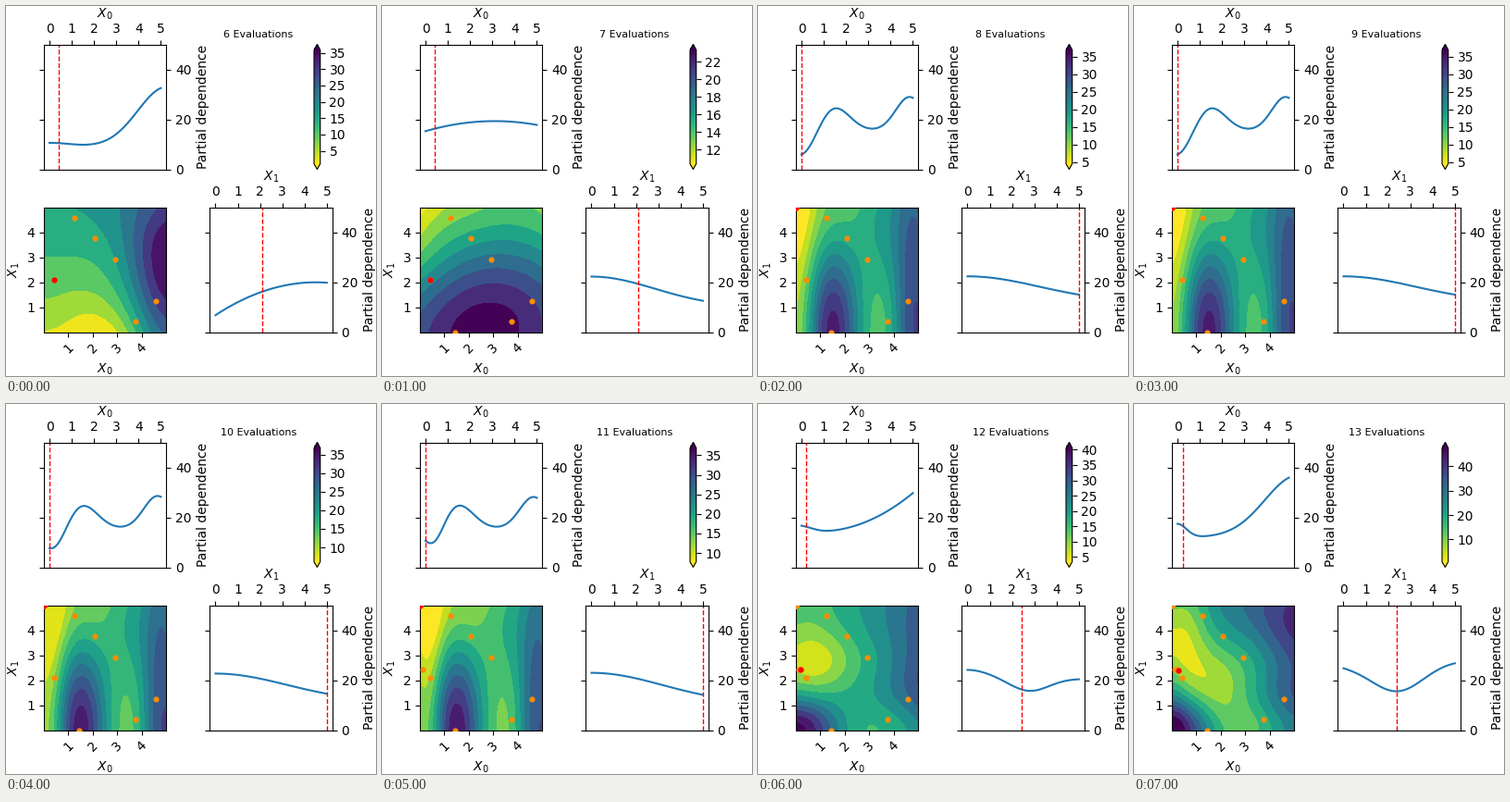
A matplotlib script for the animation above (8000 ms loop, 400 by 400 pixels).

```python
import numpy as np
import matplotlib.pyplot as plt
from matplotlib.animation import FuncAnimation
from matplotlib.cm import ScalarMappable
from matplotlib.colors import Normalize
from matplotlib.ticker import MaxNLocator

SIZE = 400
CMAP = "viridis_r"
AX_W, AX_H = 132.45, 134.95
LEFT, RIGHT = 41, 220.45
TOP, BOTTOM = 41.6, 217.75

GRID = np.linspace(0, 5, 60)
x, y = GRID[None, :], GRID[:, None]

# Six cells of a Latin square come first, then the suggested settings
cells = [(1, 5), (2, 4), (3, 3), (4, 0), (5, 1), (0, 2)]
POINTS = [((i + 0.5) * 5 / 6, (j + 0.5) * 5 / 6) for i, j in cells]
POINTS += [(1.42, 0)] + [(0, 5)] * 3 + [(0.1, 2.45), (0.2, 2.42), (0.25, 2.4)]


def best_point(count):
    if count < 8:
        return POINTS[5]
    return POINTS[7] if count < 12 else POINTS[count - 1]


def bump(t, center, width):
    return np.exp(-0.5 * ((t - center) / width) ** 2)


def hill(cx, wx, cy, wy):
    return bump(x, cx, wx) * bump(y, cy, wy)


# Each model gives its colour limits, both main effects and their interaction.

def valley():
    g = 9 + 1.6 * bump(x, 0, 1) + 24 * bump(x, 5.25, 1.28)
    h = 20 - 0.65 * (y - 4.5) ** 2
    twist = 5 * hill(0, 1, 0, 1) - 14 * hill(5, 1, 5.5, 1.2)
    return 1.07, 35.8, g, h, twist


def dome():
    g = 19.3 - 0.42 * (x - 3.1) ** 2
    h = 10 + 12.3 * bump(y, 0, 2.84)
    twist = 0.22 * (x - 2.5) * (y - 2.5) + 2.5 * hill(0, 1.2, 5, 1.2)
    return 10.37, 23.35, g, h, twist


def ridge(s):
    """Two ridges; s moves the dip on the left from the edge inwards."""
    dip = (10.6 - 2.4 * s) * bump(x, 0.37 * s, 0.64 - 0.185 * s)
    g = (15.5 - dip + 9.6 * bump(x, 1.46, 0.69)
         + (13.5 - 0.8 * s) * bump(x, 4.85, 0.62))
    h = 12 - 1.5 * s + (10.4 + 2.1 * s) * bump(y, 0, 3.2)
    side = bump(x, 1.45, 0.7) - 0.65 * bump(x, 3.5, 0.7)
    twist = 8 * np.cos(np.pi * y / 5) * side
    return 4.5 + 3.3 * s, 36.8, g, h, twist


def basin():
    g = 14.4 + 0.87 * (x - 0.8) ** 2 + 1.7 * bump(x, 0, 0.5)
    h = 20.6 + 3.6 * bump(y, 0, 1) - 4.9 * bump(y, 2.8, 0.85)
    twist = (36 * hill(0, 1.3, 0, 0.9) - 6 * hill(0.9, 1, 2.8, 0.9)
             + 5 * hill(5, 1, 2.3, 1.2))
    return 3.5, 40.5, g, h, twist


def trough():
    g = 12 + 5.4 * bump(x, 0, 0.4) + 24.8 * bump(x, 5.4, 1.47)
    h = 28 - 12.3 * bump(y, 2.4, 1.2) - 1.5 * bump(y, 0, 1)
    twist = (46 * hill(0, 1.2, 0, 0.9) - 18 * hill(0, 1, 4.3, 1.2)
             - 10 * hill(1.8, 0.9, 1.6, 0.9) - 10 * hill(5.5, 1, 5.5, 1))
    return 0.9, 47.5, g, h, twist


def model(count):
    if count < 8:
        return valley() if count == 6 else dome()
    if count < 12:
        return ridge(max(0, count - 9) / 2)
    return basin() if count == 12 else trough()


def surface(g, h, twist):
    """Centre the interaction so that g and h stay the partial means."""
    twist = (twist - twist.mean(axis=0) - twist.mean(axis=1, keepdims=True)
             + twist.mean())
    return g + h - (g.mean() + h.mean()) / 2 + twist


fig = plt.figure(figsize=(4, 4), dpi=100)


def add_axes(left, top, w=AX_W, h=AX_H):
    """Axes placed in pixels, measured from the top left corner."""
    return fig.add_axes([left / SIZE, 1 - (top + h) / SIZE, w / SIZE, h / SIZE])


def draw_curve(left, top, name, values, best):
    ax = add_axes(left, top)
    ax.plot(GRID, values.ravel())
    ax.axvline(best, ls="--", lw=1, color="r")
    ax.set(xlim=(-0.25, 5.25), ylim=(0, 50), xticks=range(6),
           yticks=(0, 20, 40), xlabel=name, ylabel="Partial dependence")
    ax.xaxis.tick_top()
    ax.xaxis.set_label_position("top")
    ax.yaxis.tick_right()
    ax.yaxis.set_label_position("right")
    ax.yaxis.set_ticks_position("both")


def draw_map(z, low, high, count):
    ax = add_axes(LEFT, BOTTOM)
    levels = MaxNLocator(11).tick_values(low, high)
    ax.contourf(GRID, GRID, np.clip(z, low, high), levels, cmap=CMAP,
                vmin=low, vmax=high)
    ax.scatter(*zip(*POINTS[:count]), s=20, lw=0, color="darkorange", zorder=3)
    ax.scatter(*best_point(count), s=20, lw=0, color="r", zorder=4)
    ax.set(xlim=(0, 5), ylim=(0, 5), xticks=range(1, 5), yticks=range(1, 5),
           xlabel="$X_0$", ylabel="$X_1$")
    ax.tick_params(axis="x", rotation=45)


def draw_bar(low, high):
    bar = ScalarMappable(Normalize(low, high), CMAP)
    ticks = MaxNLocator(9, steps=[1, 2, 2.5, 5, 10])
    fig.colorbar(bar, cax=add_axes(333, TOP, 6.75), extend="both", ticks=ticks)


def update(i):
    fig.clear()
    count = 6 + i
    low, high, g, h, twist = model(count)
    best = best_point(count)
    draw_curve(LEFT, TOP, "$X_0$", g, best[0])
    draw_curve(RIGHT, BOTTOM, "$X_1$", h, best[1])
    draw_map(surface(g, h, twist), low, high, count)
    draw_bar(low, high)
    fig.text(273 / SIZE, 1 - 34 / SIZE, f"{count} Evaluations",
             ha="center", va="baseline", fontsize=8)
    return []


anim = FuncAnimation(fig, update, frames=8, interval=1000,
                     init_func=lambda: [], repeat=True, repeat_delay=0)
plt.show()
```
